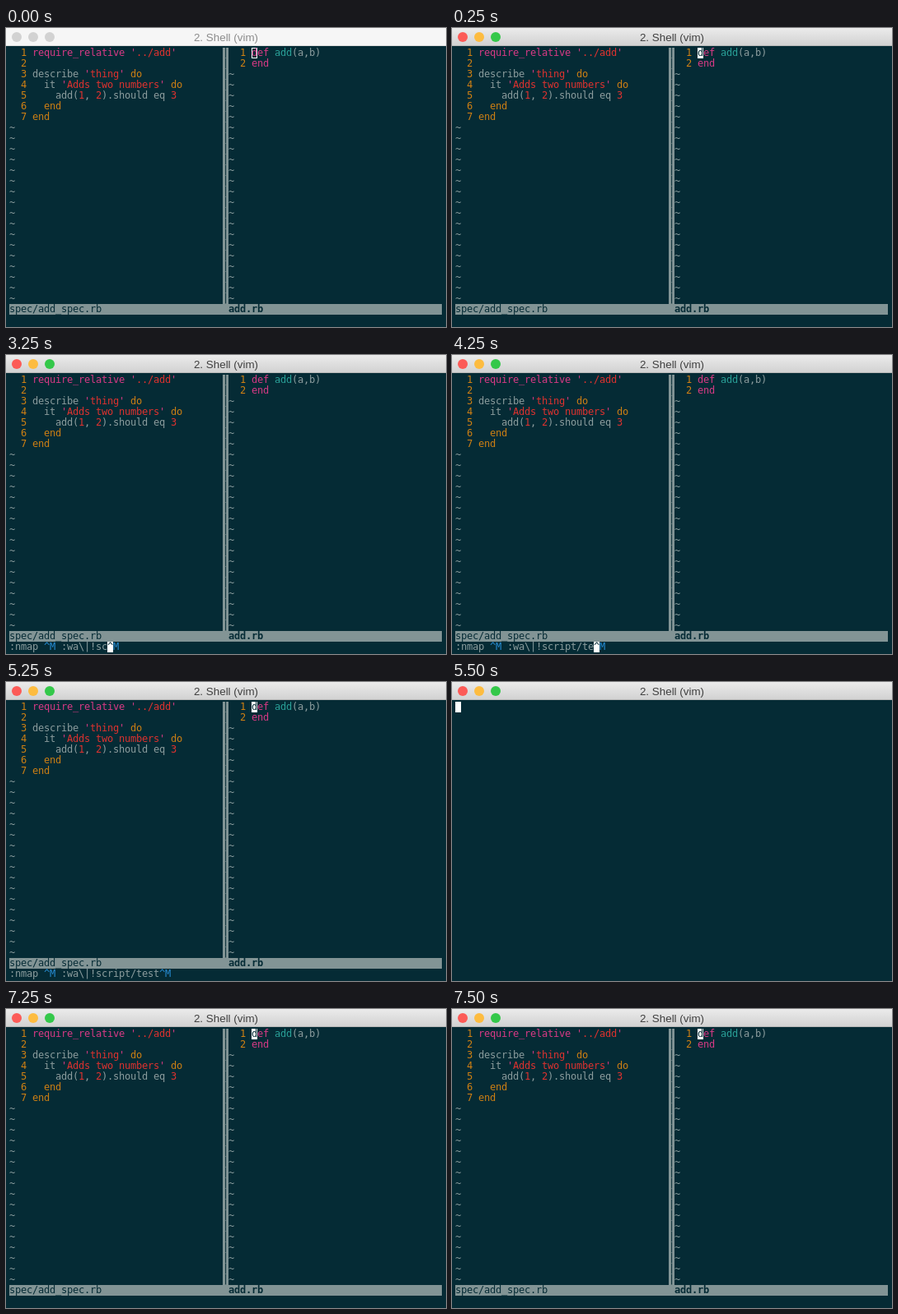
Recreate the animation shown at these times as an HTML page. Size 534 by 364 pixels, loop 8000 ms.

```html
<!DOCTYPE html>
<html lang="en">
<head>
<meta charset="utf-8">
<title>Shell (vim)</title>
<style>
  :root {
    --bg: #052b35; --fg: #8c9d9e; --bar: #829495;
    --red: #e0322f; --pink: #d93a86; --orange: #cf8013; --cyan: #2aa198; --blue: #268bd2;
  }
  html, body { margin: 0; width: 100%; height: 100%; overflow: hidden; background: var(--bg); }
  #stage { position: relative; width: 534px; height: 364px; overflow: hidden; background: var(--bg); }

  .title, .dot, .cmd, .typed, .caret, .vim, .blank, .output {
    animation: 8s step-end infinite;
  }

  /* Window chrome */
  .title {
    position: absolute; inset: 0 0 auto; height: 22px; box-sizing: border-box;
    font: 13.4px/23px "Liberation Sans", sans-serif; text-align: center;
    animation-name: focus;
  }
  .dot {
    position: absolute; top: 5px; left: var(--x); width: 12px; height: 12px;
    border-radius: 50%; animation-name: light;
  }

  /* Terminal grid: 7 x 13 px cells */
  .screen { position: absolute; inset: 0; }
  pre {
    position: absolute; left: 4px; top: 24px; margin: 0; color: var(--fg);
    font: 12px/13px "DejaVu Sans Mono", monospace; letter-spacing: calc(7px - 1ch);
  }
  i { font-style: normal; }
  .r { color: var(--red); } .p { color: var(--pink); } .o { color: var(--orange); }
  .c { color: var(--cyan); } .b { color: var(--blue); }
  .cell { display: inline-block; width: 7px; height: 13px; vertical-align: top; }
  .block { background: #fff; color: var(--bg); }

  .right { left: 270px; }
  .split, .status { background: var(--bar); color: var(--bg); }
  .split { left: 263px; width: 7px; height: 312px; overflow: hidden; }
  .status { top: 336px; width: 525px; height: 13px; }
  .cmd { top: 349px; animation-name: cmd; }
  .typed {
    display: inline-block; height: 13px; vertical-align: top; overflow: hidden;
    animation-name: type;
  }
  .caret { color: var(--pink); animation-name: caret; }
  .cmd .cell { animation: tail 8s step-end infinite; }
  .vim { animation-name: vim; }
  .blank { animation-name: blank; }
  .output { animation-name: output; }

  @keyframes focus {
    0% { background: #f6f6f6; color: #8c8c8c; border-bottom: 1px solid #dcdcdc; }
    3.125% { background: linear-gradient(#ebebeb, #d2d2d2); color: #404040; border-bottom: 1px solid #b8b8b8; }
  }
  @keyframes light {
    0% { background: #d2d2d2; }
    3.125% { background: var(--c); }
  }
  @keyframes caret {
    0% { box-shadow: inset 0 0 0 1px #fff; }
    3.125%, 65.625% { background: #fff; color: var(--bg); box-shadow: none; }
    25% { background: none; color: var(--pink); box-shadow: none; }
  }
  @keyframes tail {
    0% { background: #fff; color: var(--bg); }
    65.625% { background: none; color: var(--blue); }
  }
  @keyframes cmd {
    0%, 68.75% { visibility: hidden; }
    25% { visibility: visible; }
  }
  @keyframes type {
    0% { width: 0; }
    34.375% { width: 7px; }
    37.5% { width: 14px; }
    40.625% { width: 21px; }
    43.75% { width: 28px; }
    46.875% { width: 42px; }
    50% { width: 56px; }
    53.125% { width: 70px; }
    56.25%, 100% { width: 84px; }
  }
  @keyframes vim {
    0%, 90.625% { visibility: visible; }
    68.75% { visibility: hidden; }
  }
  @keyframes blank {
    0%, 71.875% { visibility: hidden; }
    68.75% { visibility: visible; }
  }
  @keyframes output {
    0%, 90.625% { visibility: hidden; }
    71.875% { visibility: visible; }
  }
</style>
</head>
<body>
<div id="stage">
  <div class="title">2. Shell (vim)</div>
  <div class="dot" style="--x:7px; --c:#fc5b57"></div>
  <div class="dot" style="--x:27px; --c:#fdbc40"></div>
  <div class="dot" style="--x:47px; --c:#34c84a"></div>

  <div class="screen vim">
<pre data-fill="~" data-rows="17"><i class="o">  1 </i><i class="p">require_relative '</i><i class="r">../add</i><i class="p">'</i>
<i class="o">  2 </i>
<i class="o">  3 </i>describe <i class="p">'</i><i class="r">thing</i><i class="p">'</i> <i class="o">do</i>
<i class="o">  4 </i>  it <i class="p">'</i><i class="r">Adds two numbers</i><i class="p">'</i> <i class="o">do</i>
<i class="o">  5 </i>    add(<i class="r">1</i>, <i class="r">2</i>).should eq <i class="r">3</i>
<i class="o">  6   end</i>
<i class="o">  7 end</i>
</pre>
<pre class="split" data-fill="|" data-rows="24"></pre>
<pre class="right" data-fill="~" data-rows="22"><i class="o">  1 </i><i class="cell caret">d</i><i class="p">ef</i> <i class="c">add</i>(a,b)
<i class="o">  2 </i><i class="p">end</i>
</pre>
<pre class="status">spec/add_spec.rb                      <b>add.rb</b></pre>
<pre class="cmd">:nmap <i class="b">^M</i> :wa\|<i class="typed">!script/test</i><i class="cell">^</i><i class="b">M</i></pre>
  </div>

  <div class="screen blank"><pre><i class="cell block"> </i></pre></div>

  <div class="screen output">
<pre><i class="r">F</i>

Failures:

  1) thing Adds two numbers
<i class="r">     Failure/Error: add(1, 2).should eq 3

       expected: 3
            got: nil

       (compared using ==)</i>
<i class="c">     # ./spec/add_spec.rb:5:in `block (2 levels) in &lt;top (required)&gt;'</i>

Finished in 0.00074 seconds (files took 0.11214 seconds to load)
<i class="r">1 example, 1 failure</i>

Failed examples:

<i class="r">rspec ./spec/add_spec.rb:4</i> <i class="c"># thing Adds two numbers</i>


shell returned 1

Press ENTER or type command to continue<i class="cell block"> </i></pre>
  </div>
</div>
<script>
  // Pad each pane down to the status line.
  for (const pane of document.querySelectorAll('[data-fill]')) {
    const { fill, rows } = pane.dataset;
    pane.append(`${fill}\n`.repeat(rows));
  }
</script>
</body>
</html>
```
